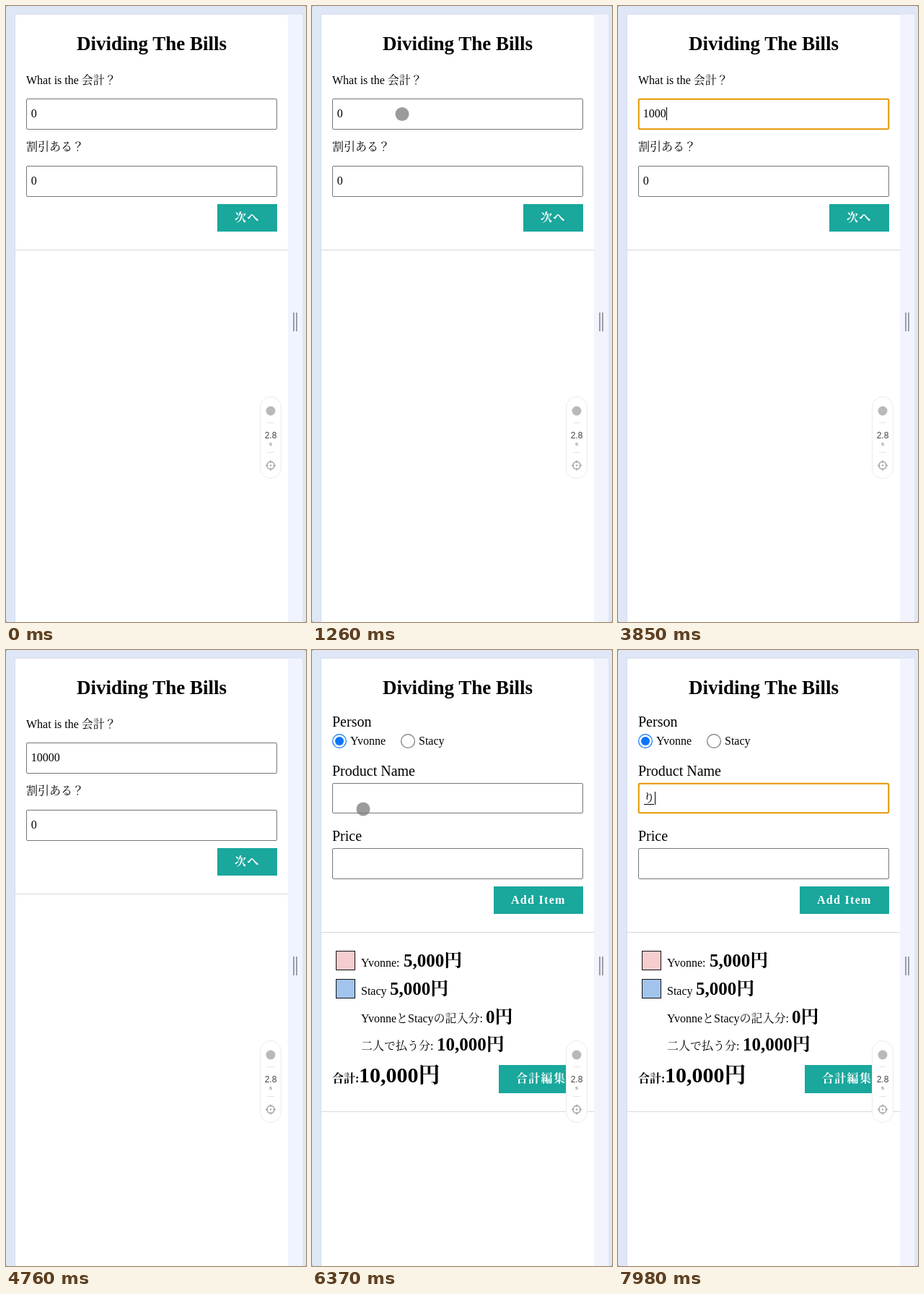
Recreate the animation shown at these times as an HTML page. Size 416 by 852 pixels, loop 8000 ms.

```html
<!DOCTYPE html>
<html lang="ja">
<head>
<meta charset="utf-8">
<style>
html, body { margin: 0; width: 100%; height: 100%; overflow: hidden; }
svg { display: block; width: 416px; height: 852px; }
text { font-family: "Liberation Serif", "Noto Serif CJK JP", "Noto Sans CJK JP", serif; font-size: 16px; white-space: pre; }
.sans { font-family: "Liberation Sans", sans-serif; }
</style>
</head>
<body>
<svg id="stage" viewBox="0 0 416 852"></svg>
<script>
const LOOP = 8000, STEP = 70;
const TEAL = '#1aa79c';

const text = (x, y, s, size = 16, extra = '') =>
  `<text x="${x}" y="${y}" style="font-size:${size}px" ${extra}>${s}</text>`;
const bold = (x, y, s, size, extra = '') => text(x, y, s, size, 'font-weight="700" ' + extra);
const rect = (x, y, w, h, fill, extra = '') =>
  `<rect x="${x}" y="${y}" width="${w}" height="${h}" fill="${fill}" ${extra}/>`;
const line = (x1, y1, x2, y2, color, w = 1) =>
  `<path d="M${x1} ${y1}L${x2} ${y2}" stroke="${color}" stroke-width="${w}"/>`;
const field = (y, h) => rect(28.5, y + .5, 347, h - 1, '#fff', 'rx="1.5" stroke="#767676"');
const ring = (id, y, h) =>
  rect(28.75, y + .75, 346.5, h - 1.5, 'none', `id="${id}" rx="2" stroke="#e59700" stroke-width="2"`);
const button = (x, y, w, h, label) =>
  rect(x, y, w, h, TEAL) + bold(x + 24, y + 24, label, 16, 'fill="#fff" letter-spacing="1.3"');
const caret = (id, y) => rect(0, y, 1, 18, '#000', `id="${id}"`);
const swatch = (y, fill) => rect(33.5, y + .5, 26, 26, fill, 'stroke="#111"');
const radio = (x, color) =>
  `<circle cx="${x}" cy="126" r="9.4" fill="#fff" stroke="${color}" stroke-width="1.2"/>`;

const frame =
  rect(0, 0, 416, 852, '#939db0') +
  rect(0, 0, 416, 852, '#dfe7f6', 'rx="2.5"') +
  rect(391, 12, 20, 840, '#f1f4fd') +
  rect(12, 11, 379, 841, '#d6deec') +
  rect(13, 12, 378, 840, '#fff') +
  rect(398, 424, 2, 26, '#9a9fa8') + rect(402, 424, 2, 26, '#9a9fa8') +
  bold(202, 61, 'Dividing The Bills', 27, 'text-anchor="middle"');

const billPage = '<g id="bill">' +
  text(28, 108, 'What is the 会計？') + field(128, 43) +
  text(28, 200, '割引ある？') + field(221, 43) + text(34.7, 247, '0') +
  button(293, 274, 83, 38, '次へ') +
  line(13, 337.5, 391, 337.5, '#d8d8d8') +
  ring('billRing', 128, 43) + text(34.7, 154, '0', 16, 'id="amount"') + caret('billCaret', 140) +
  '</g>';

const itemPage = '<g id="items">' +
  text(28, 106, 'Person', 20) +
  radio(38, '#0a75ff') + '<circle cx="38" cy="126" r="6" fill="#0a75ff"/>' + text(53, 131, 'Yvonne') +
  radio(133, '#767676') + text(148, 131, 'Stacy') +
  text(28, 174, 'Product Name', 20) + field(184, 42) +
  text(28, 264, 'Price', 20) + field(274, 43) +
  button(252, 327, 124, 38, 'Add Item') +
  line(13, 390.5, 391, 390.5, '#d8d8d8') +
  swatch(416, '#f5cdcf') + text(68, 438, 'Yvonne:') + bold(127, 438, '5,000円', 25) +
  swatch(455, '#a2c4ec') + text(68, 477, 'Stacy') + bold(108, 477, '5,000円', 25) +
  text(68, 515, 'YvonneとStacyの記入分:') + bold(241, 516, '0円', 25) +
  text(68, 553, '二人で払う分:') + bold(173, 554, '10,000円', 25) +
  bold(28, 598, '合計:', 16) + bold(65, 598, '10,000円', 30) +
  button(259, 574, 117, 39, '合計編集') +
  line(13, 638.5, 391, 638.5, '#d8d8d8') +
  ring('nameRing', 184, 42) + text(35, 210, '', 16, 'id="name"') +
  rect(36, 213, 14, 1, '#000', 'id="underline"') + caret('nameCaret', 196) +
  '</g>';

const widget =
  rect(352.5, 540.5, 29, 113, '#fff', 'rx="14.5" stroke="#ebebeb"') +
  '<circle cx="367" cy="560" r="6.5" fill="#b9b9b9"/>' +
  line(362, 576.5, 372, 576.5, '#e4e4e4') + line(362, 617.5, 372, 617.5, '#e4e4e4') +
  text(367, 598, '2.8', 12, 'class="sans" text-anchor="middle" fill="#444"') +
  bold(367, 608, 's', 8, 'class="sans" text-anchor="middle" fill="#999"') +
  '<g fill="none" stroke="#a6a6a6" stroke-width="1.4"><circle cx="367" cy="635.5" r="5.2"/>' +
  '<path d="M367 628.5v3.5M367 639v3.5M360 635.5h3.5M370.5 635.5h3.5"/></g>' +
  '<circle cx="367" cy="635.5" r="1.2" fill="#a6a6a6"/>';

const pointer =
  '<path id="arrow" d="M0 0V14.2L3.2 11.3L5.5 17L8 16L5.7 10.5H10Z" fill="#000" stroke="#fff" stroke-width="1" paint-order="stroke"/>' +
  '<circle id="touch" r="9.5" fill="#7f7f7f" fill-opacity=".78"/>';

document.getElementById('stage').innerHTML = frame + billPage + itemPage + widget + pointer;

const el = id => document.getElementById(id);
const show = (id, on) => el(id).setAttribute('visibility', on ? 'inherit' : 'hidden');
const within = (t, a, b) => t >= a && t < b;

// Pointer visits: [time, x, y]
const visits = [
  [[70, 323, 707], [210, 300, 620], [350, 262, 500], [490, 232, 420], [560, 232, 420],
   [630, 178, 250], [700, 153, 188], [910, 134, 160], [1120, 123, 150], [1400, 127, 149],
   [1820, 137, 149], [2240, 140, 150]],
  [[6160, 16, 262], [6370, 71, 220], [6510, 76, 210], [6650, 66, 207],
   [6720, 66, 207], [6860, 42, 206], [6930, 42, 206]]
];

function pointerAt(t) {
  const path = visits.find(p => within(t, p[0][0], p[p.length - 1][0]));
  if (!path) return null;
  const i = path.findIndex(p => p[0] > t);
  const [t0, x0, y0] = path[i - 1], [t1, x1, y1] = path[i];
  const k = (t - t0) / (t1 - t0);
  return [x0 + (x1 - x0) * k, y0 + (y1 - y0) * k];
}

const keys = [3080, 3220, 3430, 3710, 3990];

function draw(now) {
  const t = Math.floor(now % LOOP / STEP) * STEP;
  const onBill = t < 4900;
  show('bill', onBill);
  show('items', !onBill);

  const typed = keys.filter(k => t >= k).length;
  const amount = typed ? '10000'.slice(0, typed) : '0';
  const billFocus = within(t, 1820, 4410);
  el('amount').textContent = amount;
  el('billCaret').setAttribute('x', 35 + 8 * amount.length);
  show('billRing', onBill && billFocus);
  show('billCaret', onBill && billFocus && !within(t, 2310, 2800));

  const kana = t >= 7980 ? 'り' : t >= 7910 ? 'ｒ' : '';
  const nameFocus = t >= 6650;
  el('name').textContent = kana;
  el('nameCaret').setAttribute('x', kana ? 51 : 35);
  show('underline', !onBill && kana);
  show('nameRing', nameFocus);
  show('nameCaret', nameFocus && !within(t, 7210, 7700));

  const pos = pointerAt(t);
  const isArrow = t < 770;
  show('arrow', pos && isArrow);
  show('touch', pos && !isArrow);
  if (pos) el(isArrow ? 'arrow' : 'touch').setAttribute('transform', `translate(${pos})`);
}

const start = performance.now();
function tick() {
  draw(performance.now() - start);
  requestAnimationFrame(tick);
}
tick();
</script>
</body>
</html>
```
